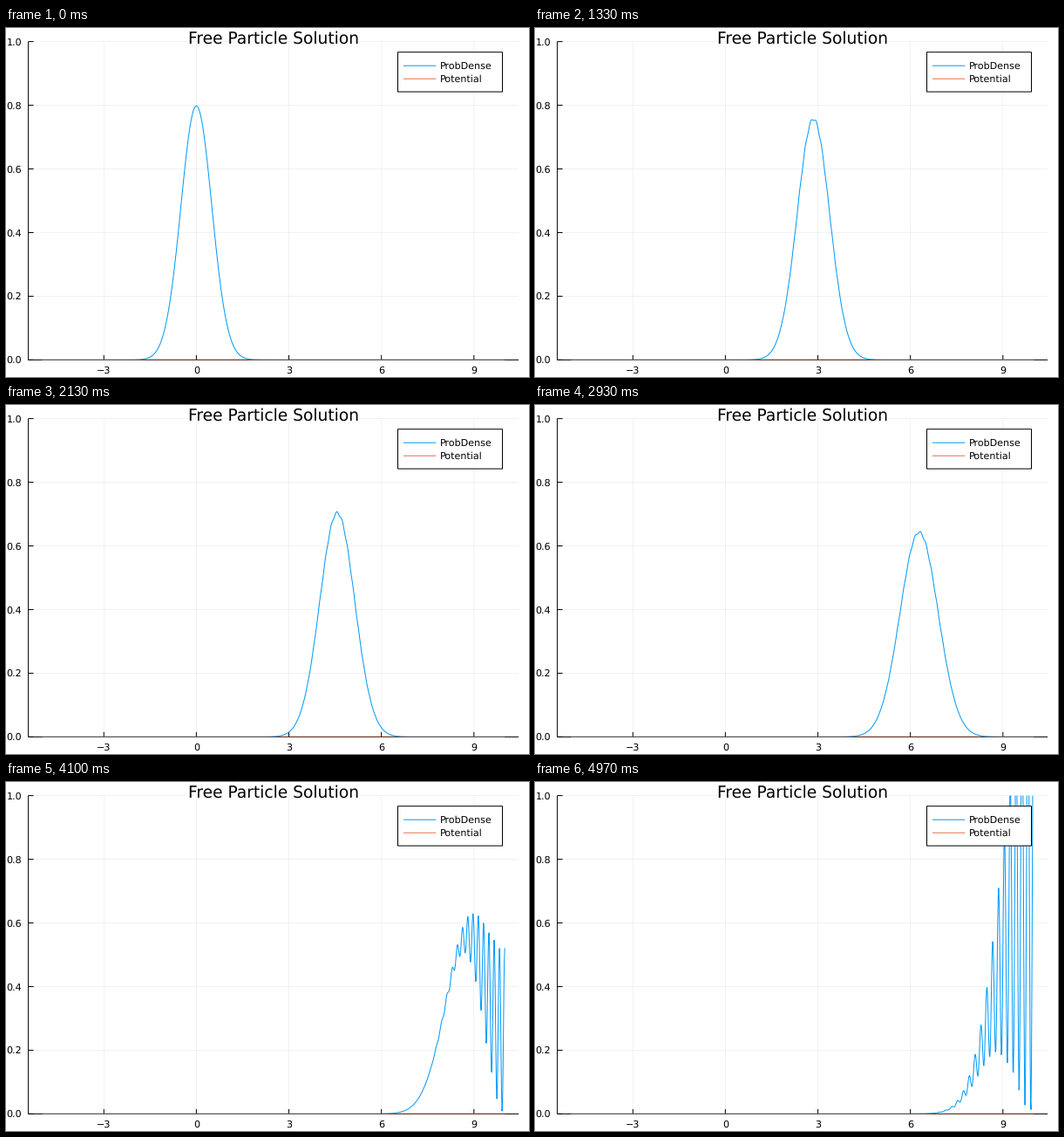
Recreate the animation shown at these times as a matplotlib script. Size 600 by 400 pixels, loop 5010 ms.

```python
import matplotlib.pyplot as plt
import numpy as np
from matplotlib.animation import FuncAnimation
from matplotlib.patches import Rectangle
from matplotlib.path import Path

W, H, DPI = 600, 400, 100
TICK, TICKS = 10, 501   # clock tick in ms, ticks per loop
LAST = 149              # last simulation step
PX = 72 / DPI           # points per pixel

BLUE, RED = "#009afa", "#e36f47"
LEFT, RIGHT, TOP, BASE = 25.6, 588.1, 15.6, 380.4
X0, UNIT = 218.4, 35.38

K = 17.1           # mean momentum
STEP = 0.004175    # simulated time per step
LAG = 4e-5         # stagger between real and imaginary parts
WALL = 10

plt.rcParams["font.family"] = "DejaVu Sans"
plt.rcParams["text.hinting"] = "none"
plt.rcParams["path.simplify"] = False


def px(x):
    return X0 + UNIT * x


def py(y):
    return BASE + (TOP - BASE) * y


def packet(x, t):
    """Spreading Gaussian wave packet of a free particle."""
    s = 1 + 2j * t
    phase = 1j * (K * x - K * K * t / 2)
    return (2 / np.pi) ** 0.25 / np.sqrt(s) * np.exp(phase - (x - K * t) ** 2 / s)


def reflected(x, t):
    return packet(x, t) + packet(2 * WALL - x, t)


def density(x, t):
    late = max(t - LAG, 0)
    return reflected(x, t).real ** 2 + reflected(x, late).imag ** 2


fig = plt.figure(figsize=(W / DPI, H / DPI), dpi=DPI, facecolor="white")
ax = fig.add_axes([0, 0, 1, 1])
ax.set_xlim(0, W)
ax.set_ylim(H, 0)
ax.axis("off")


def line(xs, ys, color="black", width=1.0, z=2, **kw):
    return ax.plot(xs, ys, color=color, lw=width * PX, zorder=z, snap=False,
                   solid_capstyle="butt", **kw)[0]


def label(x, y, text, size=11.1, ha="center"):
    ax.text(x, y, text, fontsize=size * PX, ha=ha, va="baseline", zorder=8)


# Grid, ticks and tick labels
for v in (-3, 0, 3, 6, 9):
    x = px(v)
    line([x, x], [TOP, BASE], width=0.5, z=1, alpha=0.1)
    line([x, x], [BASE, BASE - 5.5])
    label(x, 395.4, str(v).replace("-", "\u2212"))
for i in range(6):
    y = py(i / 5)
    line([LEFT, RIGHT], [y, y], width=0.5, z=1, alpha=0.1)
    line([LEFT, LEFT + 6], [y, y])
    label(18.2, y + 3.9, f"{i / 5:.1f}", ha="right")

line([LEFT, RIGHT], [BASE, BASE])
line([LEFT, LEFT], [TOP, BASE])
label((LEFT + RIGHT) / 2, 17.7, "Free Particle Solution", size=18.7)

# Curves, clipped smoothly along the plot edge
frame = Path([(LEFT, TOP), (RIGHT, TOP), (RIGHT, BASE), (LEFT, BASE), (LEFT, TOP)])
grid = np.linspace(-5, WALL, 1001)
curve = line(px(grid), py(density(grid, 0)), BLUE, z=3)
flat = line([px(-5), px(WALL)], [BASE, BASE], RED, z=4)
for c in (curve, flat):
    c.set_clip_path(frame, ax.transData)

# Legend
ax.add_patch(Rectangle((449.5, 27.7), 120, 45.4, fc="white", ec="black",
                       lw=PX, zorder=6, snap=False))
for y, color, name in ((43.2, BLUE, "ProbDense"), (58.2, RED, "Potential")):
    line([456, 493.3], [y, y], color, z=7)
    label(498, y + 4.1, name, ha="left")


def update(n):
    # 30 steps per second, each starting on the nearest clock tick
    step = min(int((n + 0.5) * TICK * 0.03), LAST)
    curve.set_ydata(py(density(grid, step * STEP)))
    return (curve,)


anim = FuncAnimation(fig, update, frames=TICKS, interval=TICK,
                     repeat=True, repeat_delay=0, blit=False)
plt.show()
```
